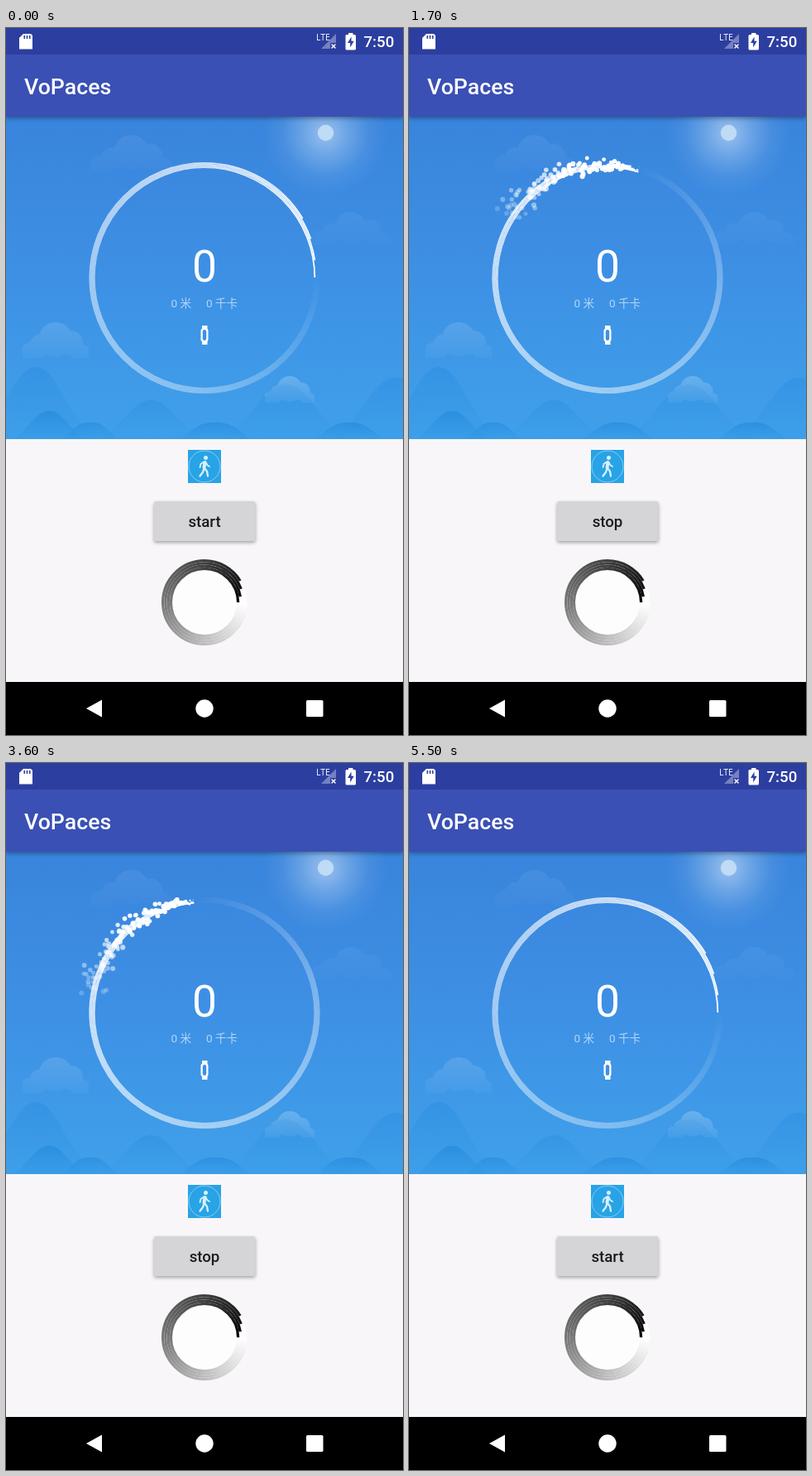
An HTML page with a canvas that plays this animation: 480x853 px, repeating every 5.6 s.

```html
<!DOCTYPE html>
<html lang="en">
<head>
<meta charset="utf-8">
<title>Step tracker</title>
<style>
html, body { margin: 0; width: 100%; height: 100%; overflow: hidden; background: #f8f6f9; }
canvas { display: block; }
</style>
</head>
<body>
<canvas id="stage" width="480" height="853"></canvas>
<script>
const ctx = document.getElementById('stage').getContext('2d');
const TAU = Math.PI * 2;
const LOOP = 5600, STEP = 100;
const START = 150, STOP = 4900, LIFE = 400, SPACING = 3.2;
const CX = 240, CY = 301.5;
// Time and clockwise degrees of the comet head
const HEAD = [[START, 0], [600, 80.5], [1700, 286.1], [2400, 405.6], [3600, 624.4], [4600, 799.2], [STOP, 853]];
const LAG = [0, 9, 20, 31];

const rad = deg => deg * Math.PI / 180;
const clamp = v => Math.max(0, Math.min(1, v));
const white = a => `rgba(255,255,255,${a})`;

function rand(seed) {
  const v = Math.sin(seed * 127.1 + 311.7) * 43758.5453;
  return v - Math.floor(v);
}

function headAngle(t) {
  if (t < START || t >= STOP) return 0;
  const i = HEAD.findIndex(k => k[0] > t);
  const [t0, a0] = HEAD[i - 1], [t1, a1] = HEAD[i];
  return a0 + (a1 - a0) * (t - t0) / (t1 - t0);
}

function rect(x, y, w, h, fill) {
  ctx.fillStyle = fill;
  ctx.fillRect(x, y, w, h);
}

function round(x, y, w, h, r, fill) {
  ctx.fillStyle = fill;
  ctx.beginPath();
  ctx.roundRect(x, y, w, h, r);
  ctx.fill();
}

function disc(x, y, r, fill) {
  ctx.fillStyle = fill;
  ctx.beginPath();
  ctx.arc(x, y, r, 0, TAU);
  ctx.fill();
}

function poly(points, fill) {
  ctx.fillStyle = fill;
  ctx.beginPath();
  points.forEach(([x, y]) => ctx.lineTo(x, y));
  ctx.closePath();
  ctx.fill();
}

function line(points, width, color) {
  ctx.strokeStyle = color;
  ctx.lineWidth = width;
  ctx.lineCap = ctx.lineJoin = 'round';
  ctx.beginPath();
  points.forEach(([x, y]) => ctx.lineTo(x, y));
  ctx.stroke();
}

function text(str, x, y, size, fill, weight = 400, align = 'left', family = 'Roboto, "Noto Sans CJK SC", "Noto Sans CJK", sans-serif') {
  ctx.font = `${weight} ${size}px ${family}`;
  ctx.textAlign = align;
  ctx.fillStyle = fill;
  ctx.fillText(str, x, y);
}

function fade(y0, y1, from, to) {
  const g = ctx.createLinearGradient(0, y0, 0, y1);
  g.addColorStop(0, from);
  g.addColorStop(1, to);
  return g;
}

function shadowed(blur, dy, alpha, draw) {
  ctx.save();
  ctx.shadowColor = `rgba(0,0,0,${alpha})`;
  ctx.shadowBlur = blur;
  ctx.shadowOffsetY = dy;
  draw();
  ctx.restore();
}

// Puffs standing on a flat base
function cloud(x, base, w, h, alpha) {
  ctx.save();
  ctx.beginPath();
  ctx.rect(x, base - h * 1.1, w, h * 1.1);
  ctx.clip();
  ctx.fillStyle = fade(base - h, base, white(alpha), white(alpha * 0.25));
  ctx.beginPath();
  for (const [px, py, pr] of [[0.14, 0.12, 0.32], [0.27, 0.36, 0.3], [0.5, 0.52, 0.48], [0.73, 0.42, 0.34], [0.88, 0.1, 0.28]]) {
    ctx.moveTo(x + px * w + pr * h, base - py * h);
    ctx.arc(x + px * w, base - py * h, pr * h, 0, TAU);
  }
  ctx.fill();
  ctx.restore();
}

function hill(x, top, half, alpha) {
  const base = 496;
  ctx.fillStyle = fade(top, base, `rgba(30,132,218,${alpha})`, `rgba(40,148,228,${alpha * 0.35})`);
  ctx.beginPath();
  ctx.moveTo(x - half, base);
  ctx.bezierCurveTo(x - half * 0.5, base - 18, x - half * 0.35, top, x, top);
  ctx.bezierCurveTo(x + half * 0.35, top, x + half * 0.5, base - 18, x + half, base);
  ctx.fill();
}

function scenery() {
  ctx.save();
  ctx.beginPath();
  ctx.rect(0, 107, 480, 389);
  ctx.clip();
  const sky = fade(107, 496, '#3984dc', '#40a0ea');
  sky.addColorStop(0.45, '#3d8fe4');
  rect(0, 107, 480, 389, sky);

  const glow = ctx.createRadialGradient(386, 127, 8, 386, 127, 76);
  glow.addColorStop(0, white(0.42));
  glow.addColorStop(0.3, white(0.24));
  glow.addColorStop(0.65, white(0.07));
  glow.addColorStop(1, white(0));
  rect(300, 107, 180, 100, glow);
  disc(386.5, 126.5, 9.7, '#bfdbf6');

  cloud(102, 173, 99, 44, 0.07);
  cloud(367, 262, 100, 40, 0.05);
  cloud(20, 398, 80, 43, 0.13);

  hill(36, 409, 78, 0.3);
  hill(175, 449, 62, 0.28);
  hill(338, 430, 80, 0.28);
  hill(471, 422, 82, 0.3);
  cloud(313, 452, 60, 32, 0.22);
  hill(52, 462, 42, 0.55);
  hill(102, 476, 32, 0.5);
  hill(253, 476, 42, 0.55);
  hill(415, 476, 40, 0.55);
  ctx.restore();
}

function bars() {
  shadowed(5, 2, 0.35, () => rect(0, 32, 480, 75, '#3a50b4'));
  rect(0, 0, 480, 32, '#2c3e9f');
  text('VoPaces', 22, 79.5, 26.67, '#fff', 500);

  poly([[21, 7], [30, 7], [32, 9], [32, 25.5], [16, 25.5], [16, 12]], '#fff');
  for (const x of [21.5, 24.7, 27.9]) rect(x, 9, 1.6, 4, '#2c3e9f');

  text('LTE', 375, 15, 10.5, '#fff', 500, 'left', '"Open Sans", sans-serif');
  poly([[399, 7], [399, 25], [381, 25]], white(0.35));
  rect(392, 18, 8, 8, '#2c3e9f');
  line([[394, 20], [398, 24]], 1.5, '#fff');
  line([[398, 20], [394, 24]], 1.5, '#fff');

  rect(414, 6, 5.5, 3, '#fff');
  round(410.5, 8, 12.5, 18.5, 1.5, '#fff');
  poly([[417.5, 10.5], [413, 18], [416.2, 18], [416.2, 23.5], [420.7, 15.8], [417.5, 15.8]], '#2c3e9f');
  text('7:50', 432.5, 23, 18.67, '#fff', 500);

  rect(0, 789, 480, 64, '#000');
  poly([[97, 821], [116, 810.5], [116, 831.5]], '#fff');
  disc(240, 821, 10.7, '#fff');
  round(363, 811, 20.5, 20, 1.5, '#fff');
}

// Concentric strokes, the outer ones ending earlier
function ring(x, y, inner, pitch, angle, stops) {
  const g = ctx.createConicGradient(rad(angle % 360), x, y);
  stops.forEach((c, i) => g.addColorStop(i / (stops.length - 1), c));
  ctx.strokeStyle = g;
  ctx.lineCap = 'butt';
  ctx.lineWidth = pitch;
  LAG.forEach((lag, i) => {
    ctx.beginPath();
    ctx.arc(x, y, inner + (i + 0.5) * pitch, rad(angle), rad(angle + 359.9 - lag));
    ctx.stroke();
  });
}

function sparks(t) {
  const first = Math.ceil(Math.max(START, t - LIFE) / SPACING);
  const last = Math.floor(t / SPACING);
  for (let i = first; i <= last; i++) {
    const born = i * SPACING;
    const k = (t - born) / LIFE;
    const side = rand(i) + rand(i + 0.37) - 1;
    const spread = 1.5 + 23 * Math.pow(k, 0.85);
    const r = 134 + Math.min(1, k * 8) * 1.5 + k * 4 + side * spread;
    const a = rad(headAngle(born) + (rand(i + 0.71) - 0.5) * 7 * k);
    const size = (0.8 + 1.9 * clamp(k * 9)) * (0.9 + 0.25 * rand(i + 0.53));
    disc(CX + r * Math.cos(a), CY + r * Math.sin(a), size, white(0.95 - 0.75 * clamp((k - 0.45) / 0.55)));
  }
}

function readout() {
  text('0', 240, 306, 53.33, '#fff', 400, 'center');
  text('0 米', 199.5, 337, 13.6, white(0.62));
  text('0 千卡', 242, 337, 13.6, white(0.62));
  rect(237, 359, 6.5, 23, '#fff');
  round(235.5, 362.5, 9, 16, 3, '#fff');
  round(237.8, 364, 4.4, 13, 2.2, '#3d92e5');
}

function walker() {
  rect(220, 509, 40, 40, '#28a3e6');
  ctx.strokeStyle = white(0.55);
  ctx.lineWidth = 0.8;
  ctx.beginPath();
  ctx.arc(240, 529, 19, 0, TAU);
  ctx.stroke();
  const c = '#d9f0fc';
  disc(241.5, 518.5, 2.5, c);
  line([[240.5, 524], [239.5, 530]], 4, c);
  line([[239, 523.5], [235.5, 526], [234.5, 530]], 1.8, c);
  line([[241.5, 524], [243.5, 527.5], [246, 529]], 1.8, c);
  line([[239.5, 531], [238, 536], [234.5, 540.5]], 2.3, c);
  line([[240, 531], [243, 535], [244, 540.5]], 2.3, c);
}

function button(label, press) {
  const tone = Math.round(213 - 13 * press);
  shadowed(4, 2, 0.35, () => round(179, 571, 122.5, 48, 2.5, `rgb(${tone},${tone - 1},${tone + 1})`));
  text(label, 240, 602, 18.67, '#1b1b1c', 500, 'center');
}

function pointer() {
  shadowed(3, 0, 0.3, () => disc(217, 588, 15, 'rgba(245,245,248,0.75)'));
  ctx.strokeStyle = 'rgba(150,165,200,0.75)';
  ctx.lineWidth = 1.3;
  ctx.beginPath();
  ctx.arc(217, 588, 15, 0, TAU);
  ctx.stroke();
}

function draw(t) {
  const running = t >= START && t < STOP;
  rect(0, 0, 480, 853, '#f8f6f9');
  scenery();
  bars();
  ring(CX, CY, 132.4, 1.8, headAngle(t), [0, 0.36, 0.54, 0.76, 1].map(white));
  if (running) sparks(t);
  readout();
  walker();

  const press = t < 1000 ? clamp((t - 50) / 150) * clamp((900 - t) / 300)
    : clamp((t - 4600) / 200) * clamp((5400 - t) / 300);
  button(running ? 'stop' : 'start', press);
  if (t === 100 || (t >= 4600 && t < 4800)) pointer();

  disc(240, 693, 51, '#fdfdfe');
  ring(240, 693, 39, 3.25, 0, ['#fff', '#bdbdbd', '#777', '#404040', '#000']);
}

let shown = -1;
function frame(now) {
  const t = Math.floor(now % LOOP / STEP) * STEP;
  if (t !== shown) draw(shown = t);
  requestAnimationFrame(frame);
}
draw(0);
requestAnimationFrame(frame);
</script>
</body>
</html>
```
